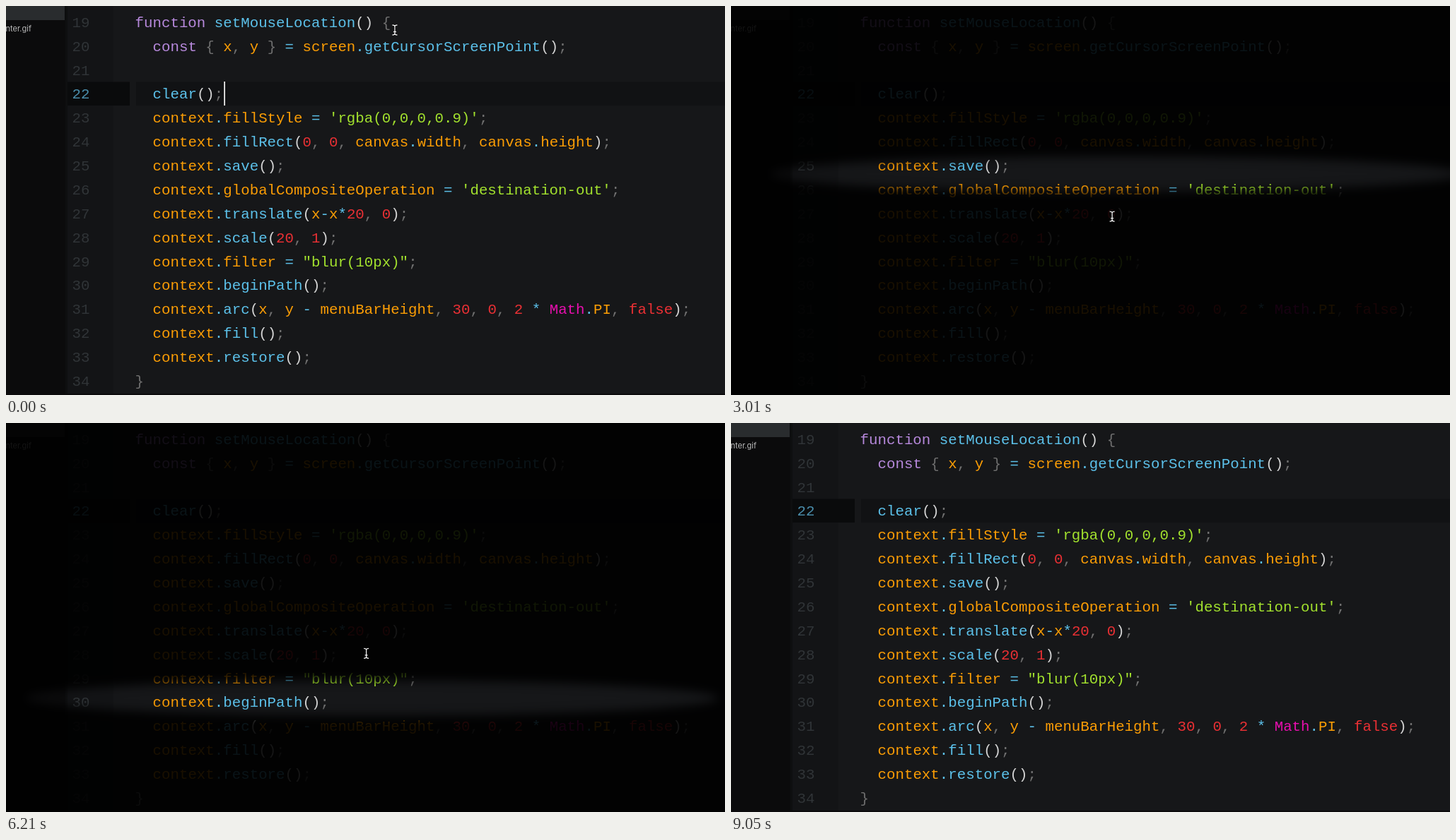
An HTML page with a canvas for the animation above (9.36 s loop, 1017x551 px).

```html
<!DOCTYPE html>
<html lang="en">
<head>
<meta charset="utf-8">
<title>Code spotlight</title>
<style>
html, body { margin: 0; width: 100%; height: 100%; overflow: hidden; background: #000; }
canvas { display: block; }
</style>
</head>
<body>
<canvas id="stage" width="1017" height="551"></canvas>
<script>
const W = 1017, H = 551, LOOP = 9360;
const LINE = 33.86, CHAR = 12.47, CODE_X = 182.6;
const SHOW = 1080, HIDE = 7880, STEP = 85, LAG = 130;
const MOVE_START = 1500, MOVE_END = 7180;

const code = `function setMouseLocation() {
  const { x, y } = screen.getCursorScreenPoint();

  clear();
  context.fillStyle = 'rgba(0,0,0,0.9)';
  context.fillRect(0, 0, canvas.width, canvas.height);
  context.save();
  context.globalCompositeOperation = 'destination-out';
  context.translate(x-x*20, 0);
  context.scale(20, 1);
  context.filter = "blur(10px)";
  context.beginPath();
  context.arc(x, y - menuBarHeight, 30, 0, 2 * Math.PI, false);
  context.fill();
  context.restore();
}`.split('\n');

// Where the mouse rests or turns: time, y
const turns = [
  [MOVE_START, 34], [2450, 166], [2570, 166], [3480, 455], [4780, 200], [4913, 200],
  [5590, 494], [6830, 93], [MOVE_END, 160], [HIDE, 160], [8700, -20]
];

const clamp = (v, lo, hi) => Math.min(hi, Math.max(lo, v));
const ease = k => (1 - Math.cos(Math.PI * k)) / 2;

function mouseAt(t) {
  const last = turns.length - 1;
  const found = turns.findIndex(p => p[0] > t);
  const i = clamp(found < 0 ? last : found, 1, last);
  const [t0, y0] = turns[i - 1], [t1, y1] = turns[i];
  const y = y0 + (y1 - y0) * ease(clamp((t - t0) / (t1 - t0), 0, 1));
  // The hand drifts left over time and slightly right on the way down
  const x = 549.5 - 0.0095 * (clamp(t, MOVE_START, MOVE_END) - MOVE_START) + 0.013 * y;
  return [x, y];
}

function layer() {
  const c = document.createElement('canvas');
  c.width = W;
  c.height = H;
  return c.getContext('2d');
}

function rect(c, color, x, y, w, h) {
  c.fillStyle = color;
  c.fillRect(x, y, w, h);
}

function tokenColor(token, next) {
  if (/^['"]/.test(token)) return '#a3e22e';
  if (/^(function|const)$/.test(token)) return '#b789dc';
  if (/^(\d+|false)$/.test(token)) return '#ea3034';
  if (token === 'Math') return '#e80fae';
  if (/^\w/.test(token)) return next === '(' ? '#5cc1ea' : '#fb9d05';
  if (/[()]/.test(token)) return '#d4d4d4';
  return /[.=*-]/.test(token) ? '#5cc1ea' : '#707070';
}

function drawEditor(c) {
  rect(c, '#161719', 0, 0, W, H);
  rect(c, '#0b0b0c', 0, 0, 84, H);
  rect(c, '#292c2e', 0, 0, 83, 20);
  rect(c, '#0e0f10', 84, 0, 3, H);
  rect(c, '#131416', 87, 0, 65, H);
  rect(c, '#0a0b0c', 87, 107.5, 88, 33.5);
  rect(c, '#111214', 184, 107.5, W - 184, 33.5);
  rect(c, '#0c0b0c', 0, 549, W, 2);

  c.font = '11px Inter, "Liberation Sans", sans-serif';
  c.fillStyle = '#b9b9b9';
  c.fillText('nter.gif', -0.5, 36);

  c.font = '20.78px "Liberation Mono", "DejaVu Sans Mono", monospace';
  code.forEach((line, row) => {
    const y = 29.9 + row * LINE;
    c.fillStyle = row === 3 ? '#4a8dab' : '#303437';
    c.fillText(19 + row, 93.5, y);
    for (const m of line.matchAll(/'[^']*'|"[^"]*"|[a-z]\w*|\d+|\S/gi)) {
      c.fillStyle = tokenColor(m[0], line[m.index + m[0].length]);
      c.fillText(m[0], CODE_X + m.index * CHAR, y);
    }
  });
}

const ctx = document.getElementById('stage').getContext('2d');
const editor = layer(), shade = layer();
drawEditor(editor);

function drawShade(x, y) {
  shade.clearRect(0, 0, W, H);
  rect(shade, 'rgba(0,0,0,0.9)', 0, 0, W, H);
  shade.save();
  shade.globalCompositeOperation = 'destination-out';
  shade.filter = 'blur(7px)';
  shade.fillStyle = '#000';
  shade.beginPath();
  shade.ellipse(x + 6, y + 1, 490, 25, 0, 0, 2 * Math.PI);
  shade.fill();
  shade.restore();
  ctx.drawImage(shade.canvas, 0, 0);
}

function drawMouse(x, y) {
  ctx.beginPath();
  for (const s of [-1, 1]) {
    ctx.moveTo(x - 3.5, y + 7 * s);
    ctx.quadraticCurveTo(x, y + 7 * s, x, y + 5 * s);
    ctx.quadraticCurveTo(x, y + 7 * s, x + 3.5, y + 7 * s);
  }
  ctx.moveTo(x, y - 6);
  ctx.lineTo(x, y + 6);
  ctx.moveTo(x - 2, y + 2.5);
  ctx.lineTo(x + 2, y + 2.5);
  for (const [color, width] of [['#000', 2.6], ['#f2f2f2', 1.3]]) {
    ctx.strokeStyle = color;
    ctx.lineWidth = width;
    ctx.stroke();
  }
}

function draw(time) {
  const t = time % LOOP;
  // The screen refreshes in even steps
  const shown = Math.floor((t - 25) / STEP) * STEP + 25;
  ctx.drawImage(editor.canvas, 0, 0);
  const caretOn = t < 360 || t >= 810 && Math.floor((t - 810) / 391) % 2 === 0;
  if (caretOn) rect(ctx, '#f4f4f4', 308.3, 107, 1.7, 34);
  if (t >= SHOW && t < HIDE) drawShade(...mouseAt(shown - LAG));
  drawMouse(...mouseAt(shown));
}

const start = performance.now();
function tick() {
  draw(performance.now() - start);
  requestAnimationFrame(tick);
}
tick();
</script>
</body>
</html>
```
